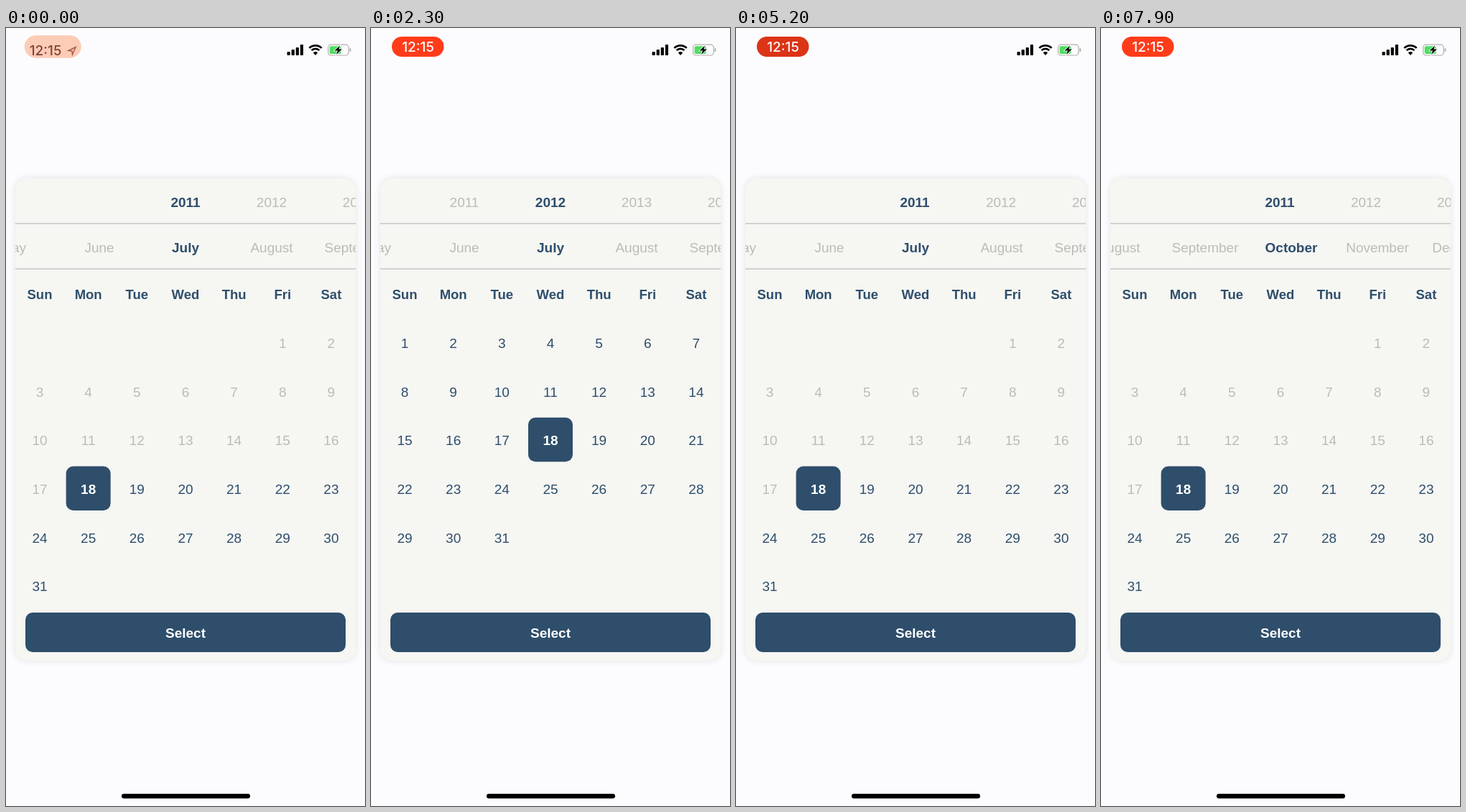
Write an HTML page with a canvas that moves like this. It is 500 px wide and 1082 px high and loops after 8000 ms.

```html
<!DOCTYPE html>
<html lang="en">
<head>
<meta charset="utf-8">
<title>Date picker</title>
<style>
  html, body { margin: 0; width: 100%; height: 100%; overflow: hidden; background: #fcfcfe; }
  canvas { display: block; }
</style>
</head>
<body>
<canvas id="stage" width="500" height="1082"></canvas>
<script>
const ctx = document.getElementById('stage').getContext('2d');
const LOOP = 8000;
const CARD = '#f6f6f3', DARK = '#2e4e6b', MUTED = '#bcbcb6', LINE = '#c4c4c8';
const SANS = '"Liberation Sans", Arial, sans-serif';
const REGULAR = `19px ${SANS}`, BOLD = `bold 19px ${SANS}`, WEEKDAY = `bold 18.5px ${SANS}`;
const CLOCK = '500 19px Inter, sans-serif';
const DAYS = 'Sun Mon Tue Wed Thu Fri Sat'.split(' ');
const MONTHS = ('January February March April May June July August ' +
  'September October November December').split(' ');
const YEARS = Array.from({ length: 10 }, (_, i) => String(2011 + i));
const MIN_DATE = new Date(2011, 6, 18);
const CELL = 67.65;

// Scroll positions as [time, item index]
const yearTrack = [[1250, 0], [1500, .058], [2150, 1], [4250, 1], [4800, .008]];
const monthTrack = [[2950, 6], [3700, 5], [4850, 5], [5150, 6], [5500, 6],
  [6200, 3.146], [6400, 3], [6500, 3], [6850, 6], [7200, 6], [7900, 8.875], [8000, 9]];

const clamp = x => Math.min(1, Math.max(0, x));
const mix = (a, b, k) => a + (b - a) * k;
const mixColor = (a, b, k) => `rgb(${a.map((v, i) => Math.round(mix(v, b[i], k)))})`;
const ease = k => k * k * (3 - 2 * k);

function sample(track, t) {
  if (t <= track[0][0]) return track[0][1];
  for (let i = 1; i < track.length; i++) {
    const [t0, v0] = track[i - 1], [t1, v1] = track[i];
    if (t < t1) return mix(v0, v1, ease((t - t0) / (t1 - t0)));
  }
  return track[track.length - 1][1];
}

function text(str, x, y, font, color) {
  ctx.font = font;
  ctx.fillStyle = color;
  ctx.fillText(str, x, y + 7);
}

function box(x, y, w, h, r, color) {
  ctx.fillStyle = color;
  ctx.beginPath();
  ctx.roundRect(x, y, w, h, r);
  ctx.fill();
}

function shape(points, color, stroke) {
  ctx.beginPath();
  points.forEach(([x, y]) => ctx.lineTo(x, y));
  ctx.closePath();
  if (stroke) {
    ctx.strokeStyle = stroke;
    ctx.lineWidth = 1.5;
    ctx.stroke();
  }
  if (color) {
    ctx.fillStyle = color;
    ctx.fill();
  }
}

function drawClock(t) {
  const k = ease(clamp(t / 400)), grow = 3.3 * (1 - k);
  const dim = 1 - .14 * Math.max(0, Math.cos(2 * Math.PI * (t - 5200) / 2000));
  const red = [255, 60, 26].map(v => v * dim);
  box(29 - grow, 12 - grow / 2, 72.5 + 2 * grow, 28 + grow, 14 + grow / 2,
    mixColor([252, 204, 182], red, k));
  ctx.globalAlpha = 1 - k;
  text('12:15', 55, 31, CLOCK, '#82433a');
  shape([[87, 31.5], [97, 26.5], [92.5, 37], [91.8, 32]], null, '#a35b4c');
  ctx.globalAlpha = k;
  text('12:15', 65.5, 26, CLOCK, '#fff');
  ctx.globalAlpha = 1;
}

function drawStatusIcons() {
  [5, 8, 11, 15].forEach((h, i) => box(391.5 + i * 6.1, 38 - h, 4.2, h, 1, '#000'));

  ctx.strokeStyle = '#000';
  ctx.lineWidth = 2.7;
  const a = Math.PI / 4;
  for (const r of [7.6, 12.2]) {
    ctx.beginPath();
    ctx.arc(431, 36.5, r, -3 * a, -a);
    ctx.stroke();
  }
  ctx.fillStyle = '#000';
  ctx.beginPath();
  ctx.moveTo(431, 38);
  ctx.arc(431, 37.5, 4.4, -3 * a, -a);
  ctx.fill();

  ctx.strokeStyle = '#adada8';
  ctx.lineWidth = 1.2;
  ctx.beginPath();
  ctx.roundRect(448.7, 23.2, 28.5, 14.8, 4);
  ctx.stroke();
  box(450.7, 25.2, 16, 10.8, 2, '#4fdc62');
  box(478.6, 28, 1.8, 5, 1, '#adada8');
  shape([[465, 24.5], [457.5, 31.5], [462, 31.5], [460, 37], [468, 29.5], [463.5, 29.5]],
    '#000', '#fcfcfe');
}

function drawScroller(items, position, y) {
  const selected = Math.round(position);
  ctx.save();
  ctx.beginPath();
  ctx.rect(13, y - 30, 474, 60);
  ctx.clip();
  items.forEach((label, i) => {
    const x = 250 + (i - position) * 120, on = i === selected;
    if (x > -60 && x < 560) text(label, x, y, on ? BOLD : REGULAR, on ? DARK : MUTED);
  });
  ctx.restore();
}

function drawMonth(year, month) {
  const first = new Date(year, month, 1).getDay();
  const count = new Date(year, month + 1, 0).getDate();
  for (let day = 1; day <= count; day++) {
    const slot = first + day - 1;
    const x = 47 + slot % 7 * CELL, y = 438 + Math.floor(slot / 7) * CELL;
    if (day === 18) {
      box(x - 31, y - 31.5, 62, 61.5, 10, DARK);
      text(day, x, y, BOLD, '#fff');
    } else {
      text(day, x, y, REGULAR, new Date(year, month, day) < MIN_DATE ? MUTED : DARK);
    }
  }
}

function draw(t) {
  ctx.fillStyle = '#fcfcfe';
  ctx.fillRect(0, 0, 500, 1082);
  ctx.textAlign = 'center';
  drawClock(t);
  drawStatusIcons();

  ctx.save();
  ctx.shadowColor = 'rgba(70, 70, 80, .14)';
  ctx.shadowBlur = 9;
  box(13, 209, 474, 671, 16, CARD);
  ctx.restore();

  drawScroller(YEARS, sample(yearTrack, t), 242);
  drawScroller(MONTHS, sample(monthTrack, t), 305);
  for (const y of [271.3, 334.3]) box(13, y, 474, 1.5, 0, LINE);

  DAYS.forEach((name, i) => text(name, 47 + i * CELL, 370, WEEKDAY, DARK));
  if (t >= 2200 && t < 3750) drawMonth(2012, 6);
  else if (t >= 3750 && t < 4850) drawMonth(2012, 5);
  else drawMonth(2011, 6);

  box(27, 813, 446, 55, 10, DARK);
  text('Select', 250, 841, BOLD, '#fff');
  box(161, 1065, 179, 6.5, 3.25, '#000');
}

function tick(now) {
  draw(now % LOOP);
  requestAnimationFrame(tick);
}
requestAnimationFrame(tick);
</script>
</body>
</html>
```
